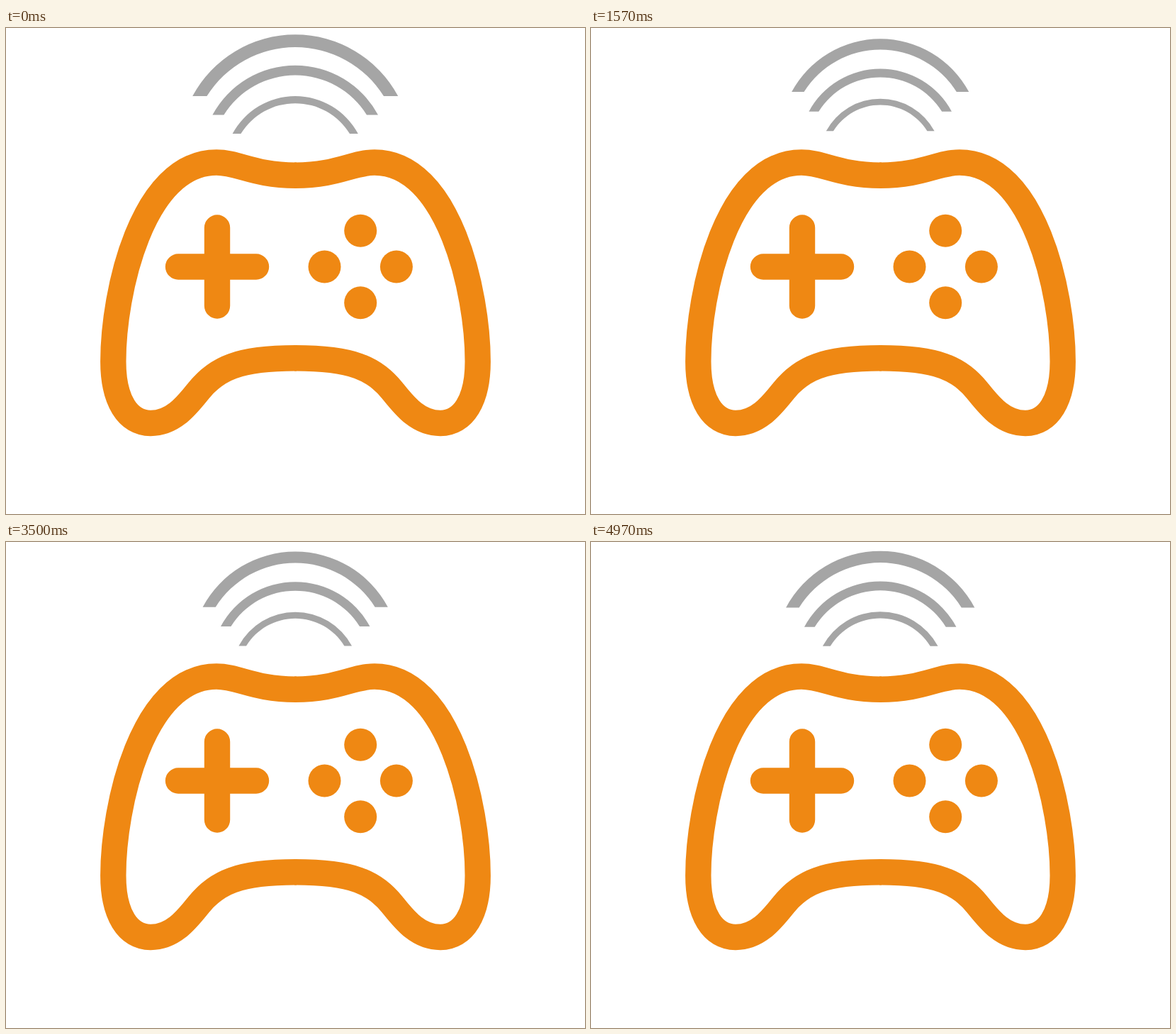
Recreate the animation shown at these times as an HTML page. Size 817 px wide and 685 px high, loop 5010 ms.

```html
<!DOCTYPE html>
<html lang="en">
<head>
<meta charset="utf-8">
<title>Wireless gamepad</title>
<style>
  html, body { margin: 0; width: 100%; height: 100%; overflow: hidden; background: #fff; }
  svg { display: block; width: 100vw; height: 100vh; }
  .pad { fill: none; stroke: #ef8813; stroke-width: 36.4; }
  .cross { stroke-linecap: round; }
  #buttons { fill: #ef8813; }
  #waves { fill: #a5a5a5; }
</style>
</head>
<body>
<svg viewBox="0 0 817 685">
  <g id="waves"></g>
  <g class="pad">
    <path id="half" d="M410 207.7H408.5C350 207.7 328 189.5 297 189.5C192 189.5 151.3 373 151.3 470
      C151.3 525 172 557 204 557C236 557 255 532 272 511C297 480 328 465.3 408.5 465.3H410"/>
    <use href="#half" transform="translate(817) scale(-1 1)"/>
    <path class="cross" d="M243 336.5H353M298 281.5V391.5"/>
  </g>
  <g id="buttons"></g>
</svg>
<script>
  const LOOP = 5010, STEP = 100 / 3, LAST = 149, PULSE = 27, CX = 408.2;

  function add(parent, tag, attrs) {
    const el = document.createElementNS('http://www.w3.org/2000/svg', tag);
    for (const name in attrs) el.setAttribute(name, attrs[name]);
    document.getElementById(parent).append(el);
    return el;
  }

  for (let i = 0; i < 4; i++) {
    const a = i * Math.PI / 2;
    add('buttons', 'circle', { cx: 500.2 + 50.7 * Math.cos(a), cy: 336.5 + 50.7 * Math.sin(a), r: 23 });
  }

  const radius = (half, height) => (half * half + height * height) / (2 * height);

  // A band between two circular arcs, cut flat below and centred on its own middle
  function addWave(i) {
    const top = 9.3 + 43.4 * i, bottom = 96 + 26.5 * i, band = 17.7 - 3.8 * i;
    const outer = 145 - 28.2 * i, inner = 124.8 - 24 * i;
    const h = bottom - top, ro = radius(outer, h), ri = radius(inner, h - band);
    const d = `M${-outer} ${h / 2}A${ro} ${ro} 0 0 1 ${outer} ${h / 2}` +
      `H${inner}A${ri} ${ri} 0 0 0 ${-inner} ${h / 2}Z`;
    return { el: add('waves', 'path', { d }), y: (top + bottom) / 2 };
  }

  const waves = [0, 1, 2].map(addWave);

  // Quick swell, slower fall: a sine with a weak overtone
  function scaleAt(step) {
    const w = 2 * Math.PI / PULSE;
    return 0.9696 + 0.1205 * Math.cos(w * (step - 5.4)) + 0.0237 * Math.cos(2 * w * (step - 4));
  }

  function draw(time) {
    const step = Math.min(LAST, Math.floor((time % LOOP + 3.4) / STEP));
    const s = scaleAt(step);
    for (const { el, y } of waves) {
      el.setAttribute('transform', `translate(${CX} ${y}) scale(${s})`);
    }
  }

  function tick() {
    draw(performance.now());
    requestAnimationFrame(tick);
  }
  tick();
</script>
</body>
</html>
```
